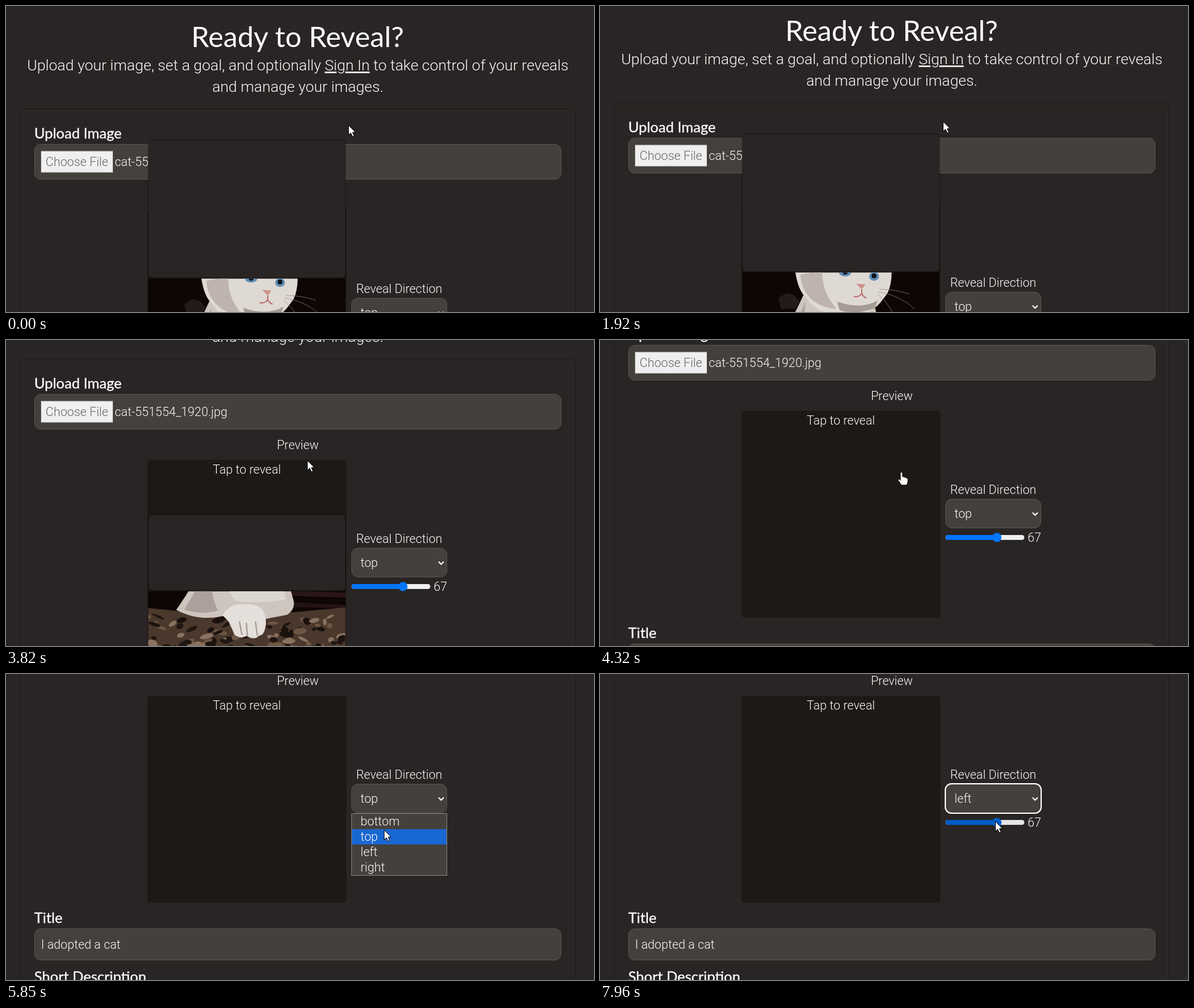
These frames come from a looping animation (957x499 px, 8 s). An HTML page:

```html
<!DOCTYPE html>
<html lang="en">
<head>
<meta charset="utf-8">
<title>Ready to Reveal?</title>
<style>
  html, body { margin: 0; width: 100%; height: 100%; overflow: hidden; background: #292524; }
  svg { display: block; width: 100%; height: 100%; }
  text { font: 300 19.9px Roboto, sans-serif; fill: #fafaf9; white-space: pre; }
  .head { font: 400 46.6px Lato, sans-serif; fill: #fff; }
  .label { font: 400 23.6px Lato, sans-serif; fill: #fff; stroke: #fff; stroke-width: .3px; }
  .lead { font-size: 24.6px; }
  .mid { text-anchor: middle; }
  .field { fill: #44403c; stroke: #57534e; }
  .shadow { filter: drop-shadow(0 0 1.2px #000); }
</style>
</head>
<body>
<svg viewBox="0 0 957 499">
  <defs>
    <clipPath id="window"><rect id="photoClip" x="231.5" width="321" y="445" height="225"/></clipPath>
  </defs>

  <g id="page">
    <text class="head mid" x="474.5" y="67">Ready to Reveal?</text>
    <text class="lead mid" x="475" y="105">Upload your image, set a goal, and optionally <tspan text-decoration="underline">Sign In</tspan> to take control of your reveals</text>
    <text class="lead mid" x="475" y="140">and manage your images.</text>

    <rect class="shadow" x="25.5" y="169.5" width="899" height="900" rx="4" fill="#292524" stroke="#35302f"/>

    <text class="label" x="46" y="216">Upload Image</text>
    <rect class="field" x="46.5" y="225.5" width="857" height="57" rx="10"/>
    <rect x="57.5" y="237" width="116" height="34" fill="#efefef" stroke="#d6d3d1"/>
    <text class="mid" x="115.5" y="261" style="fill:#666">Choose File</text>
    <text x="177" y="261">cat-551554_1920.jpg</text>

    <text class="mid" x="475" y="315">Preview</text>
    <rect x="230" y="332.5" width="324" height="337.5" rx="5" fill="#1c1917"/>
    <text class="mid" x="392" y="355">Tap to reveal</text>

    <g clip-path="url(#window)">
      <g transform="translate(0 130)">
        <rect x="231" y="200" width="323" height="345" fill="#0e0505"/>
        <path d="M290 356l14-8 12 3 9 11-8 12-12-1-10 2z" fill="#241a1a"/>
        <path d="M455 416l98 3v8l-98-3z" fill="#2a1716"/>
        <path d="M455 434l98 5v6l-98-3z" fill="#231311"/>
        <path d="M231 444l50 5 70 12 104-9 98-9v100H231z" fill="#4a382c"/>
        <g id="fur"></g>
        <path d="M334 345C318 380 302 412 277 447C300 460 330 464 358 456L372 488Q384 496 392 489Q404 498 412 489Q424 488 422 462L458 455Q474 444 466 425C462 404 448 388 447 364Z" fill="#cdc5be"/>
        <path d="M334 362C322 395 306 420 290 447Q320 456 345 448Q330 420 334 362Z" fill="#aba19a"/>
        <path d="M345 385Q400 400 445 383L456 430Q410 438 372 432Z" fill="#ddd7d1"/>
        <path d="M352 456Q366 434 392 438Q424 436 423 470Q420 490 411 489Q403 497 391 489Q382 495 372 487Q368 468 352 456Z" fill="#e4dfda"/>
        <path d="M384 488L380 466M393 489L391 468M409 489L406 466" stroke="#a1958c" stroke-width="2" fill="none"/>
        <path d="M316 296C318 325 324 346 336 356C350 382 380 384 420 384C448 379 458 362 468 348Q477 330 474 296Z" fill="#dfd9d4"/>
        <path d="M326 318C328 350 350 372 385 374Q360 345 362 312Z" fill="#beb4ad"/>
        <path d="M386 362Q425 376 452 360L447 373Q415 384 390 376Z" fill="#a69b95"/>
        <ellipse cx="399" cy="315" rx="10" ry="6" fill="#5f8db4"/>
        <ellipse cx="446" cy="321" rx="8" ry="7" fill="#5f8db4"/>
        <circle cx="399" cy="314" r="4" fill="#10151c"/>
        <circle cx="446" cy="320" r="4" fill="#10151c"/>
        <path d="M417 333l15 1-6 8z" fill="#cb8f86"/>
        <path d="M426 342v7M413 354q9 1 13-5q3 6 8 7" stroke="#b96f68" stroke-width="2" fill="none"/>
        <path d="M452 346Q490 352 512 374M452 350Q478 370 482 402M455 342Q482 342 504 350" stroke="#8d8580" stroke-width=".7" fill="none"/>
      </g>
    </g>
    <rect id="cover" class="shadow" x="232" width="320" rx="6" fill="#292524"/>

    <text class="mid" x="640" y="468">Reveal Direction</text>
    <rect class="field" x="562.5" y="476.5" width="155" height="47" rx="10"/>
    <rect id="ring" x="562" y="476" width="156" height="48" rx="10" fill="none" stroke="#fff" stroke-width="2"/>
    <text id="choice" x="577" y="507">top</text>
    <path d="M704 498.5l4.2 4.2 4.2-4.2" fill="none" stroke="#fff" stroke-width="2"/>
    <rect id="track" x="562.5" y="535" width="128" height="8" rx="4"/>
    <g id="fill">
      <rect x="562.5" y="535" width="84" height="8" rx="4"/>
      <circle cx="646" cy="539" r="7.5"/>
    </g>
    <text x="696" y="546">67</text>

    <text class="label" x="46" y="703">Title</text>
    <rect class="field" x="46.5" y="712.5" width="857" height="51" rx="10"/>
    <text x="57" y="745">I adopted a cat</text>
    <text class="label" x="46" y="799">Short Description</text>
  </g>

  <g id="menu">
    <rect x="562.5" y="227.5" width="155" height="101" fill="#44403c" stroke="#858280"/>
    <rect id="mark" x="563" width="154" height="25" fill="#1967d2"/>
    <text x="577" y="247">bottom</text>
    <text x="577" y="272">top</text>
    <text x="577" y="297">left</text>
    <text x="577" y="322">right</text>
  </g>

  <g id="cursor" fill="#fff" stroke="#000" stroke-linejoin="round">
    <path id="arrow" d="M.5 .5V16.5L4.2 13L7 19L9.6 17.8L7 12H11.8Z"/>
    <path id="hand" stroke-width=".8" d="M-2 2Q-2 .4-.4 .4Q1.2 .4 1.2 2V8Q3.6 7 4.3 9Q6.6 8.2 7.2 10Q10 9.6 10 12V15.5Q10 18 8 21.5H-.5Q-2 18.5-5.2 14.5Q-6.4 12.4-4.6 12Q-3.4 11.8-2 14Z"/>
  </g>
</svg>

<script>
const LOOP = 8000;
const $ = id => document.getElementById(id);
const set = (id, attrs) => {
  for (const name in attrs) $(id).setAttribute(name, attrs[name]);
};
const show = (id, on) => set(id, { visibility: on ? "visible" : "hidden" });

// Rows begin with a time; each holds until the next.
const scrolls = [[0, 0], [820, 3], [970, 10], [2610, 130], [2730, 137], [4320, 217], [4610, 290], [4735, 297]];
const slides = [[0, 0], [3700, .12], [3820, .45], [3940, .85], [4060, 1]];
const cursors = [ // time, x, y, hand
  [0, 557, 194], [1920, 558, 188], [3130, 498, 192, 1], [3300, 490, 194, 1],
  [3700, 490, 196], [4320, 491, 215, 1], [4610, 494, 249, 1], [4735, 500, 246, 1],
  [4860, 524, 237, 1], [5010, 612, 214], [5150, 615, 214], [5850, 615, 254],
  [5970, 615, 264], [6120, 616, 268], [6240, 617, 272], [6360, 618, 276],
  [6490, 620, 280], [6610, 621, 283], [6760, 622, 286], [7480, 626, 279],
  [7600, 631, 270], [7720, 636, 260], [7840, 640, 248], [7960, 643, 240]
];
const at = (rows, t) => rows.findLast(row => row[0] <= t);

function growFur() {
  let seed = 7;
  const rnd = () => (seed = seed * 16807 % 2147483647) / 2147483647;
  const tones = ["#1b120e", "#1f1611", "#6d5644", "#8a7260"];
  let spots = "";
  for (let i = 0; i < 130; i++) {
    const x = 231 + rnd() * 322, y = 458 + rnd() * 75, turn = rnd() * 70 - 35;
    spots += `<ellipse rx="${3 + rnd() * 9}" ry="${2 + rnd() * 4}" fill="${tones[i % 4]}" transform="translate(${x} ${y}) rotate(${turn})"/>`;
  }
  $("fur").innerHTML = spots;
}

function draw(t) {
  set("page", { transform: `translate(0 ${-at(scrolls, t)[1]})` });

  const p = at(slides, t)[1];
  const top = 219 + 451 * p, bottom = 443 + 227 * p;
  set("cover", { y: top, height: bottom - top });
  set("photoClip", { y: bottom + 1.5, height: Math.max(0, 668.5 - bottom) });

  const [, x, y, hand] = at(cursors, t);
  set("cursor", { transform: `translate(${x} ${y})` });
  show("arrow", !hand);
  show("hand", hand);

  show("menu", t >= 5430 && t < 7200);
  set("mark", { y: y >= 278 ? 278 : 253 });
  const chosen = t >= 7200, hover = t >= 7840;
  $("choice").textContent = chosen ? "left" : "top";
  show("ring", chosen);
  set("track", { fill: hover ? "#e5e5e5" : "#efefef" });
  set("fill", { fill: hover ? "#005cc8" : "#0075ff" });
}

growFur();
const start = performance.now();
function tick() {
  draw((performance.now() - start) % LOOP);
  requestAnimationFrame(tick);
}
tick();
</script>
</body>
</html>
```
